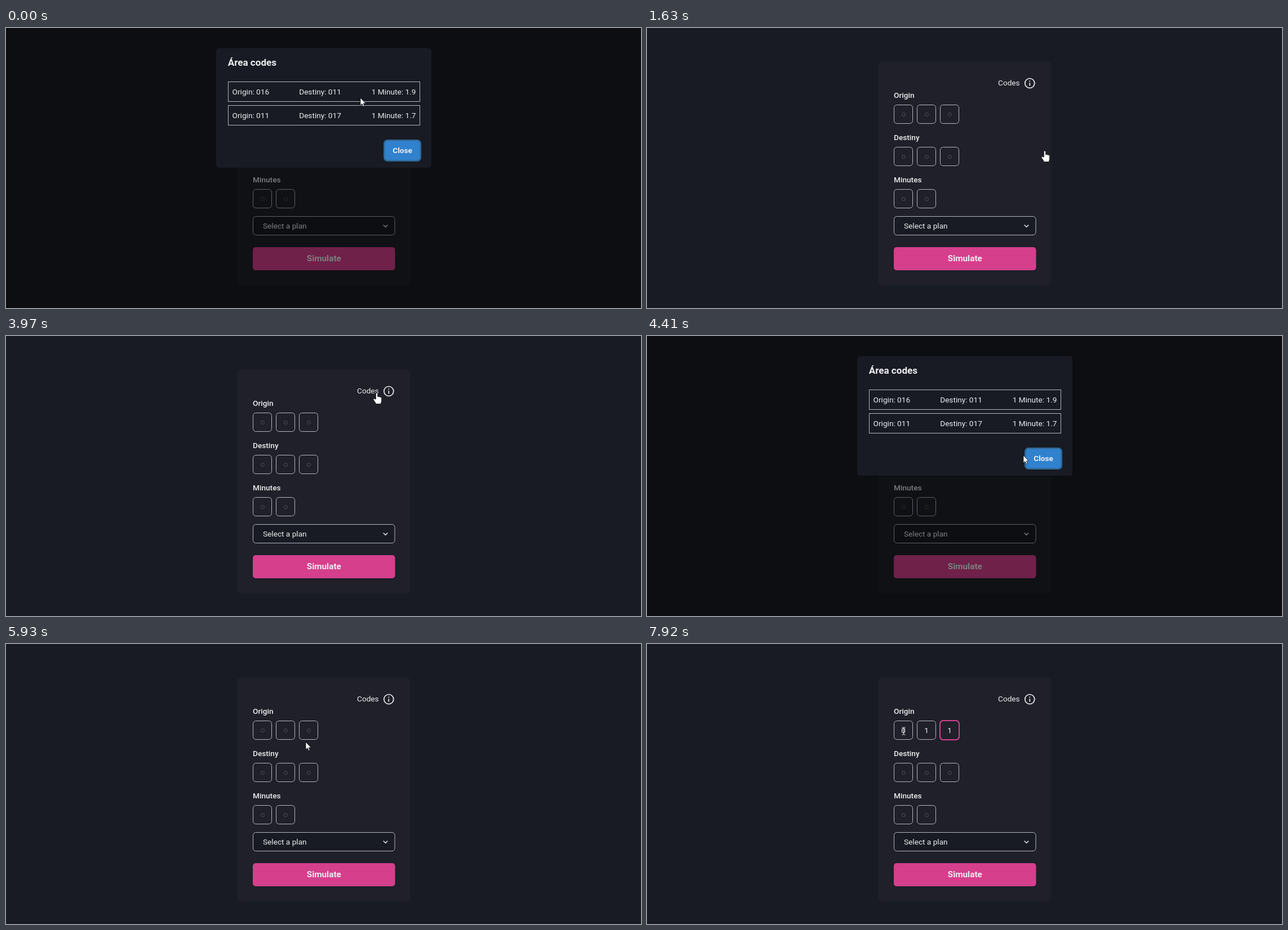
Recreate the animation shown at these times as an HTML page. Size 1127 px wide and 497 px high, loop 8 s.

```html
<!DOCTYPE html>
<html lang="en">
<head>
<meta charset="utf-8">
<title>Plan simulator</title>
<style>
  html, body { margin: 0; width: 100%; height: 100%; overflow: hidden; background: #181b23; }
  svg { display: block; font: 13.65px Roboto, sans-serif; fill: #eeeef2; }
  .medium { font-weight: 500; }
  .bold { font-weight: 700; }
  .mid { text-anchor: middle; }
  .line { fill: none; stroke: #b3b5c6; }
  .pin circle { fill: none; stroke: #5b5d68; stroke-width: .8; }
  .ring { fill: none; stroke: #d53f8c; stroke-width: 2; }
</style>
</head>
<body>
<svg width="1127" height="497" viewBox="0 0 1127 497">
  <rect x="410.5" y="59.5" width="307" height="397.5" rx="7" fill="#1f2029"/>
  <text x="623" y="102.3">Codes</text>
  <g fill="none" stroke="#eeeef2" stroke-width="1.7">
    <circle cx="679.3" cy="98" r="8.5"/>
    <path d="M679.3 97.2v5.2M679.3 93.4v1.8"/>
  </g>
  <g class="medium">
    <text x="438" y="123.5">Origin</text>
    <text x="438" y="198.5">Destiny</text>
    <text x="438" y="273.5">Minutes</text>
  </g>
  <g id="pins"></g>
  <rect class="line" x="438.5" y="334.5" width="251.5" height="33" rx="5" style="fill:#181b23"/>
  <text x="456" y="355.5">Select a plan</text>
  <path d="M669.7 349.4l3.8 3.8 3.8-3.8" fill="none" stroke="#eeeef2" stroke-width="1.4"/>
  <rect x="438" y="389" width="252.5" height="41" rx="5" fill="#d53f8c"/>
  <text class="bold mid" x="564.3" y="414.4" font-size="15.36">Simulate</text>

  <g id="modal">
    <rect width="1127" height="497" fill="#000" opacity=".48"/>
    <rect x="373" y="35.5" width="382" height="212.5" rx="5" fill="#181b23"/>
    <text class="bold" x="393.7" y="67.4" font-size="17.07">Área codes</text>
    <g id="rows"></g>
    <rect x="670" y="198" width="67" height="39" rx="7" fill="#4299e1" opacity=".6"/>
    <rect id="close" x="672.5" y="200.5" width="62" height="34" rx="5"/>
    <text class="bold mid" x="703.6" y="222.4">Close</text>
  </g>
  <path id="cursor"/>
</svg>
<script>
const $ = id => document.getElementById(id);
const between = (t, a, b) => t >= a && t < b;

$('pins').innerHTML = [[136, 3], [211, 3], [286, 2]].map(([y, n]) =>
  Array.from({ length: n }, (_, i) => `<g class="pin" transform="translate(${438 + 41 * i} ${y})">
    <rect class="line" x=".5" y=".5" width="33" height="33" rx="5"/>
    <rect class="ring" width="34" height="34" rx="5.5" opacity="0"/>
    <circle cx="17.4" cy="17.6" r="3"/>
    <path d="M18 9v16" stroke="#fff" opacity="0"/>
    <text class="mid" x="17.2" y="21.8"></text></g>`).join('')).join('');

$('rows').innerHTML = [[95, '016', '011', 1.9], [137.6, '011', '017', 1.7]].map(([y, from, to, cost]) =>
  `<rect class="line" x="394.5" y="${Math.floor(y) + .5}" width="340" height="35"/>
   <text x="401.6" y="${y + 22.8}">Origin: ${from}</text>
   <text x="520.2" y="${y + 22.8}">Destiny: ${to}</text>
   <text x="727.4" y="${y + 22.8}" text-anchor="end">1 Minute: ${cost}</text>`).join('');

const shapes = {
  arrow: 'M0 0V13.4l3-2.8 2.1 4.7 2.1-.9-2-4.5H9.4z',
  hand: 'M-1.6 11V1.6a1.6 1.6 0 0 1 3.2 0V7a1.4 1.4 0 0 1 2.6.4a1.3 1.3 0 0 1 2.4.6a1.2 1.2 0 0 1 2 1V14' +
        'c0 2-1.2 3-1.2 5.5H-1.5C-2.5 16-6 13-6 11.3c.2-1.3 1.8-1.3 2.6-.4z',
  beam: 'M-3-6.5h2.2l.8.8.8-.8H3M0-6V6M-3 6.5h2.2l.8-.8.8.8H3'
};

// Mouse moves: first step, last step, step count, end point, end shape
const moves = [
  [120, 120, 1, 615, 148, 'arrow'],
  [250, 390, 2, 686, 208, 'hand'],
  [520, 660, 2, 706, 218, 'hand'],
  [1770, 2340, 5, 476, 152, 'beam'],
  [2460, 2610, 2, 459, 147.5, 'beam'],
  [3310, 3840, 5, 658, 101, 'hand'],
  [4410, 4410, 1, 668, 212, 'arrow'],
  [4580, 4960, 4, 706, 218, 'hand'],
  [5780, 5930, 2, 532, 174, 'arrow'],
  [6100, 6250, 2, 455.5, 154.5, 'beam']
];

function mouse(t) {
  let x = 629, y = 124, shape = 'arrow';
  for (const [start, end, n, x1, y1, last] of moves) {
    if (t < start) break;
    const gap = (end - start) / (n - 1) || 1;
    const k = Math.min(n, Math.floor((t - start) / gap + 1e-6) + 1) / n;
    x += (x1 - x) * k;
    y += (y1 - y) * k;
    shape = k === 1 || shape === last ? last : 'arrow';
  }
  return { x, y, shape };
}

// Origin fields: focus intervals and typed digits
const focus = [[2880, 3970, 0], [6520, 7040, 0], [7040, 7500, 1], [7500, 8000, 2]];
const typed = [[7040, '0'], [7500, '1'], [7920, '1']];
const pins = [...document.querySelectorAll('.pin')].slice(0, 3);

function draw(t) {
  const { x, y, shape } = mouse(t);
  const cursor = $('cursor');
  cursor.setAttribute('d', shapes[shape]);
  cursor.setAttribute('transform', `translate(${x} ${y})`);
  cursor.setAttribute('fill', shape === 'beam' ? 'none' : '#fff');
  cursor.setAttribute('stroke', shape === 'beam' ? '#e8e8ea' : '#000');
  cursor.setAttribute('stroke-width', shape === 'beam' ? 1 : .7);

  $('modal').style.display = t < 1630 || between(t, 4260, 5780) ? '' : 'none';
  const over = x > 672 && y > 200 && shape === 'hand';
  const pressed = between(t, 1490, 1630) || between(t, 5630, 5780);
  $('close').setAttribute('fill', pressed ? '#2c5282' : between(t, 1370, 1490) ? '#2c5f99' : over ? '#2b6cb0' : '#3182ce');

  pins.forEach((pin, i) => {
    const [, ring, hint, caret, text] = pin.children;
    const on = focus.find(([a, b, field]) => field === i && between(t, a, b));
    const age = on ? t - on[0] : 0;
    const value = t >= typed[i][0] ? typed[i][1] : '';
    ring.setAttribute('opacity', on ? (age < 130 ? .6 : 1) : 0);
    hint.setAttribute('opacity', on || value ? 0 : 1);
    caret.setAttribute('opacity', on && !value && between(age, 130, 630) ? 1 : 0);
    text.textContent = value;
  });
}

const begin = performance.now();
function tick() {
  draw((performance.now() - begin) % 8000);
  requestAnimationFrame(tick);
}
tick();
</script>
</body>
</html>
```
